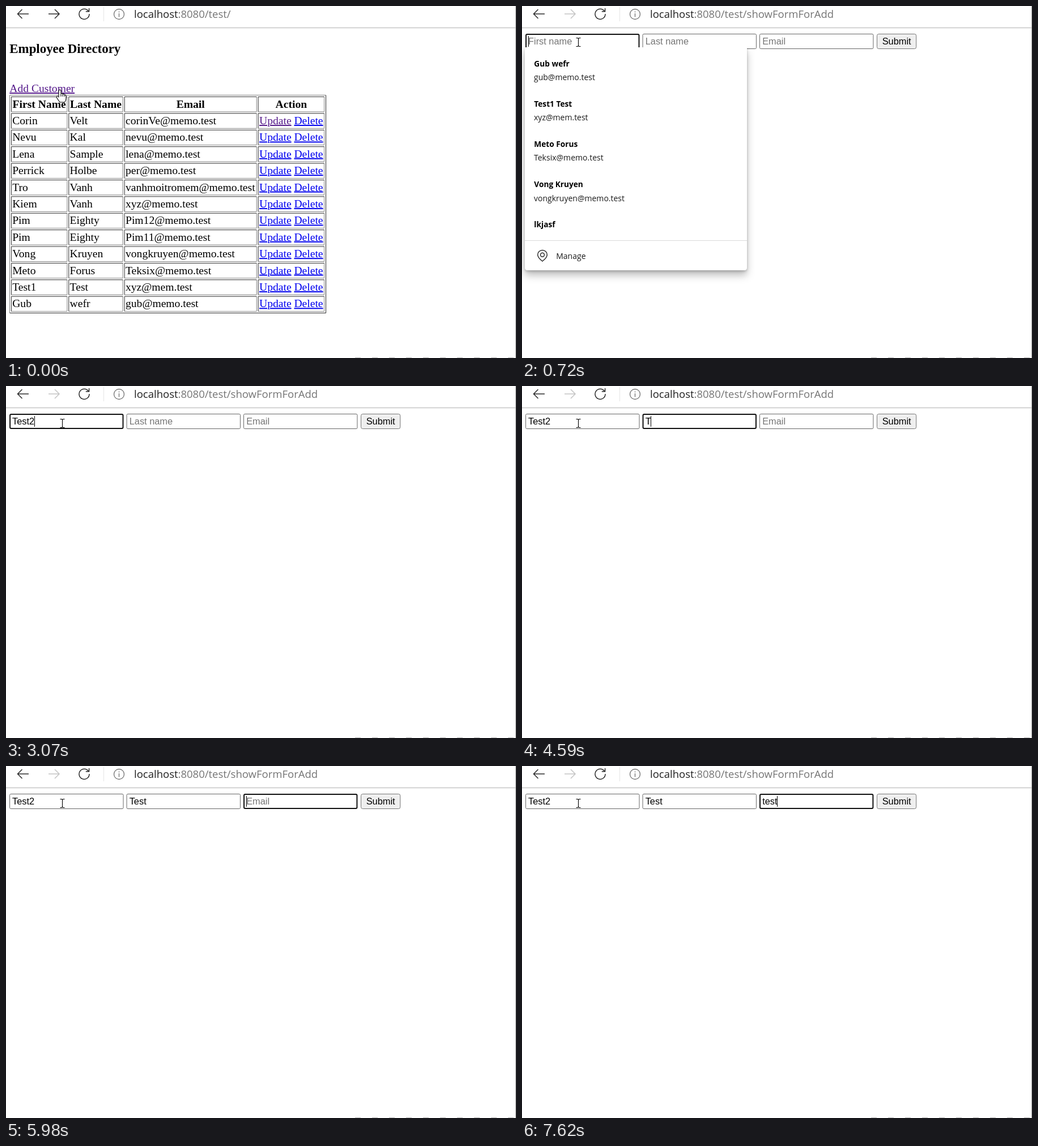
An HTML page that plays this animation: 900 px wide and 622 px high, repeating every 8 s.

```html
<!DOCTYPE html>
<html lang="en">
<head>
<meta charset="utf-8">
<title>Employee Directory</title>
<style>
  html, body { margin: 0; width: 900px; height: 622px; overflow: hidden; background: #fff; }
  svg { display: block; }
  .bar { font: 18.5px "Open Sans", sans-serif; fill: #757575; }
  .bar .host { fill: #202020; }
  .icon { fill: none; stroke: #2b2b2b; stroke-width: 1.5; }
  .icon .off { stroke: #c4c4c4; }
  .icon .info { stroke: #707070; stroke-width: 1.3; }
  .page { font: 19.6px "Liberation Serif", serif; }
  .title { font-size: 22.9px; font-weight: bold; }
  .head { font-weight: bold; text-anchor: middle; }
  .dark { fill: none; stroke: #2c2c2c; }
  .light { fill: none; stroke: #808080; }
  .link { fill: #00e; text-decoration: underline; }
  .visited { fill: #551a8b; }
  .form { font: 16.36px "Liberation Sans", sans-serif; }
  .field { fill: #fff; stroke: #666; }
  .focus { stroke: #101010; stroke-width: 2; }
  .button { fill: #efefef; stroke: #767676; }
  .hint { fill: #757575; }
  .popup { font: 14px "Open Sans", sans-serif; fill: #1b1b1b; }
  .strong { font-size: 13.7px; font-weight: 700; fill: #000; }
  .far { fill: #fff; filter: drop-shadow(0 9px 7px rgba(0, 0, 0, .25)); }
  .near { fill: #fff; filter: drop-shadow(0 2px 2px rgba(0, 0, 0, .2)); }
  .pointer { fill: #fff; stroke: #000; stroke-width: 1.1; stroke-linejoin: round; }
  .beam { fill: none; }
</style>
</head>
<body>
<svg id="stage" width="900" height="622" viewBox="0 0 900 622"></svg>
<script>
const LOOP = 8000;
const AT = '@memo.test';
const TYPO = 'xyz@mem.test';

const people = [
  ['Corin', 'Velt', 'corinVe' + AT],
  ['Nevu', 'Kal', 'nevu' + AT],
  ['Lena', 'Sample', 'lena' + AT],
  ['Perrick', 'Holbe', 'per' + AT],
  ['Tro', 'Vanh', 'vanhmoitromem' + AT],
  ['Kiem', 'Vanh', 'xyz' + AT],
  ['Pim', 'Eighty', 'Pim12' + AT],
  ['Pim', 'Eighty', 'Pim11' + AT],
  ['Vong', 'Kruyen', 'vongkruyen' + AT],
  ['Meto', 'Forus', 'Teksix' + AT],
  ['Test1', 'Test', TYPO],
  ['Gub', 'wefr', 'gub' + AT]
];

const fullName = p => p[0] + ' ' + p[1];
const recent = people.slice(-4).reverse().map(p => [fullName(p), p[2]]);
const popups = {
  all: { bottom: 467, items: [...recent, ['lkjasf', '']] },
  test: { bottom: 207.5, items: [recent[1]] },
  mail: { bottom: 207.5, items: [[recent[2][1], recent[2][0]]] }
};

// Each step changes part of the state from its time on.
const steps = [
  [0, { page: 'list', cursor: ['hand', 95, 148], focus: -1, values: ['', '', ''], caret: false, popup: '' }],
  [120, { page: 'form', cursor: ['arrow', 95, 148] }],
  [250, { cursor: ['arrow', 97, 110] }],
  [380, { cursor: ['beam', 99, 64] }],
  [580, { focus: 0, caret: true }],
  [720, { popup: 'all' }],
  [980, { cursor: ['beam', 99, 66] }],
  [1250, { caret: false }],
  [1820, { caret: true }],
  [2220, { values: ['T', '', ''], popup: 'test' }],
  [2370, { values: ['Te', '', ''] }],
  [2510, { values: ['Tes', '', ''] }],
  [2660, { values: ['Test', '', ''] }],
  [3070, { values: ['Test2', '', ''], popup: '' }],
  [3510, { focus: 1 }],
  [4060, { caret: false }],
  [4590, { values: ['Test2', 'T', ''], caret: true }],
  [4710, { values: ['Test2', 'Te', ''], popup: 'test' }],
  [4990, { values: ['Test2', 'Tes', ''] }],
  [5140, { values: ['Test2', 'Test', ''] }],
  [5560, { caret: false }],
  [5980, { focus: 2, caret: true, popup: '' }],
  [6510, { caret: false }],
  [6830, { values: ['Test2', 'Test', 'te'], caret: true, popup: 'mail' }],
  [6970, { values: ['Test2', 'Test', 'tes'], popup: '' }],
  [7480, { caret: false }],
  [7620, { values: ['Test2', 'Test', 'test'], caret: true }]
];

const text = (x, y, str, cls = '') => `<text x="${x}" y="${y}" class="${cls}">${str}</text>`;
const box = (x, y, w, h, cls, r = 0) =>
  `<rect x="${x}" y="${y}" width="${w}" height="${h}" rx="${r}" class="${cls}"/>`;
const bevel = (x, y, w, h, topLeft, bottomRight) =>
  `<path class="${bottomRight}" d="M${x} ${y + h}h${w}v${-h}"/>` +
  `<path class="${topLeft}" d="M${x} ${y + h}v${-h}h${w}"/>`;

const pen = document.createElement('canvas').getContext('2d');
pen.font = '16.36px "Liberation Sans", sans-serif';

function browserBar(page) {
  const isForm = page === 'form';
  return `
    <g class="icon">
      <path d="M40 14H20.5M28.5 6L20.5 14L28.5 22"/>
      <path class="${isForm ? 'off' : ''}" d="M75 14H94M86 6L94 14L86 22"/>
      <path d="M145.6 9.5A9 9 0 1 0 147 14M146.6 4V9.8H140.8"/>
      <g class="info">
        <circle cx="199.5" cy="14.5" r="9"/>
        <path d="M199.5 13V19.5M199.5 9.5V11.2"/>
      </g>
    </g>
    <path d="M172.5 2V27" stroke="#e6e6e6"/>
    <path d="M0 38.5H900" stroke="#c6c6c6" stroke-width="1.6"/>
    <path d="M899.5 0V622" stroke="#a0a0a0"/>
    <path d="M616 621.5H896" stroke="#bbb" stroke-dasharray="10 20"/>
    <text x="226" y="21.3" class="bar"><tspan class="host">localhost</tspan>:8080/test/${isForm ? 'showFormForAdd' : ''}</text>`;
}

function listPage() {
  const cols = [[9.4, 98.5], [110.8, 95.4], [209.2, 233], [445.1, 116.5]];
  const titles = ['First Name', 'Last Name', 'Email', 'Action'];
  const pitch = 29.4;
  let out = text(6.3, 82.5, 'Employee Directory', 'title') +
    text(6.3, 152, 'Add Customer', 'link visited') +
    bevel(6.5, 157.5, 558, 385, 'light', 'dark');
  for (let row = 0; row <= people.length; row++) {
    const base = 179.6 + pitch * row;
    cols.forEach(([x, w], c) => {
      out += bevel(x, 160.4 + pitch * row, w, 26.5, 'dark', 'light');
      if (!row) out += text(x + w / 2, base, titles[c], 'head');
      else if (c < 3) out += text(x + 1.8, base, people[row - 1][c]);
    });
    if (row) {
      out += text(447, base, 'Update', row === 1 ? 'link visited' : 'link') +
        text(508.4, base, 'Delete', 'link');
    }
  }
  return `<g class="page">${out}</g>`;
}

function formPage({ focus, values, caret }) {
  const hints = ['First name', 'Last name', 'Email'];
  const starts = [11, 217.7, 424.2];
  let out = '';
  hints.forEach((hint, i) => {
    const x = 6.1 + 206.45 * i;
    const value = values[i];
    out += i === focus ? box(x + 1, 50, 199.4, 25, 'field focus', 2) : box(x + .5, 49.5, 200.4, 26, 'field', 2);
    out += text(starts[i], 68, value || hint, value ? '' : 'hint');
    if (caret && i === focus) {
      out += box(Math.floor(starts[i] + pen.measureText(value).width), 53, 1, 19, '');
    }
  });
  out += box(626.5, 49.5, 69.2, 26, 'button', 3) + text(635.7, 68, 'Submit');
  return `<g class="form">${out}</g>`;
}

function popupList({ popup, focus }) {
  if (!popup) return '';
  const { bottom, items } = popups[popup];
  const left = [0, 207.5, 414][focus];
  const foot = bottom - 52.5;
  const shape = cls => `<path class="${cls}" d="M5 73H397V${bottom - 5}q0 5-5 5H10q-5 0-5-5Z"/>`;
  const rows = items.map(([name, detail], i) => {
    const y = 106.5 + 71.1 * i;
    return text(21.3, y, name, 'strong') + text(21, y + 24.7, detail);
  }).join('');
  return `
    <clipPath id="below"><rect x="-20" y="73" width="460" height="450"/></clipPath>
    <g class="popup" transform="translate(${left} 0)" clip-path="url(#below)">
      ${shape('far')}${shape('near')}${rows}
      <path d="M5 ${Math.floor(foot) + .5}H397" stroke="#d9d9d9"/>
      <g transform="translate(36 ${foot + 26})" class="icon">
        <path d="M0 10.5Q-8.3 4-8.3-.8A8.3 8.3 0 0 1 8.3-.8Q8.3 4 0 10.5Z"/>
        <circle cy="-.8" r="3.4"/>
      </g>
      ${text(60.2, foot + 32.8, 'Manage')}
    </g>`;
}

function pointer([kind, x, y]) {
  const paths = {
    hand: 'M-2 13V2Q-2 0 0 0T2 2V8V6.5Q5 5.5 5.3 8Q8 6.7 8.4 9Q10.5 8.3 11 11V15Q11 19 8.5 22H0Q-3 18-5.5 14Q-6.5 11.5-4.5 11.5Q-3.2 11.5-2 13ZM2 8V12M5.3 8V12M8.4 9V12',
    arrow: 'M0 0V17L4 13.5L7 20L9.5 19L6.5 12.5H12Z',
    beam: 'M-3.5-7.5H-1L.5-6.5L2-7.5H4.5M.5-6.5V6.5M-3.5 7.5H-1L.5 6.5L2 7.5H4.5'
  };
  return `<path class="pointer ${kind}" transform="translate(${x} ${y})" d="${paths[kind]}"/>`;
}

const states = [];
steps.forEach(([, change], i) => states.push({ ...states[i - 1], ...change }));

const stage = document.getElementById('stage');
let shown = -1;

function frame() {
  const t = performance.now() % LOOP;
  const now = steps.filter(([start]) => start <= t).length - 1;
  if (now !== shown) {
    shown = now;
    const s = states[now];
    stage.innerHTML = browserBar(s.page) +
      (s.page === 'list' ? listPage() : formPage(s)) + popupList(s) + pointer(s.cursor);
  }
  requestAnimationFrame(frame);
}
frame();
</script>
</body>
</html>
```
